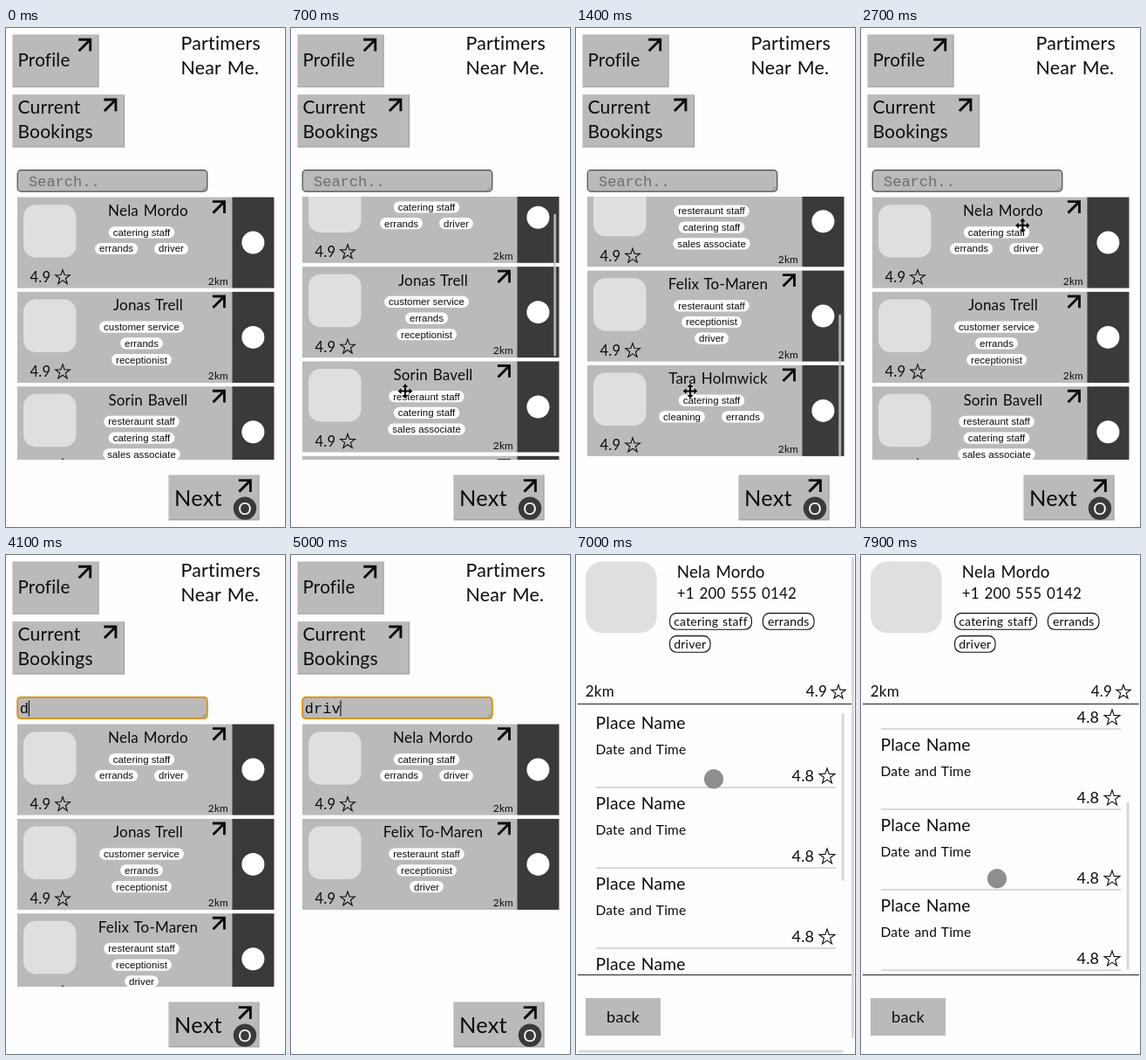
These frames come from a looping animation (320 px wide and 571 px high, 8 s). An HTML page:

```html
<!DOCTYPE html>
<html lang="en">
<head>
<meta charset="utf-8">
<title>Partimers Near Me</title>
<style>
  html, body { margin: 0; width: 100%; height: 100%; overflow: hidden; background: #fefdff; }
  svg { display: block; width: 100vw; height: 100vh; }
  text { font-family: Lato, "Open Sans", sans-serif; letter-spacing: .2px; word-spacing: .07em; fill: #0c0c0c; white-space: pre; }
  .tag { font-family: "Liberation Sans", Arial, sans-serif; letter-spacing: 0; word-spacing: 0; }
  .mono { font-family: "Courier New", "Liberation Mono", monospace; letter-spacing: 0; word-spacing: 0; }
</style>
</head>
<body>
<svg id="stage" viewBox="0 0 320 571"></svg>
<script>
const LOOP = 8000, STEP = 100;
const GRAY = '#bababb', PALE = '#dfdee0', DARK = '#3a393b', INK = '#0c0c0c';
const PITCH = 108.33, LIST_TOP = 193.6, ROW = 92;
const people = [
  { name: 'Nela Mordo', rows: [['catering staff'], ['errands', 'driver']] },
  { name: 'Jonas Trell', rows: [['customer service'], ['errands'], ['receptionist']] },
  { name: 'Sorin Bavell', rows: [['resteraunt staff'], ['catering staff'], ['sales associate']] },
  { name: 'Felix To-Maren', rows: [['resteraunt staff'], ['receptionist'], ['driver']] },
  { name: 'Tara Holmwick', rows: [['catering staff'], ['cleaning', 'errands']] }
];

// Drawing helpers
const pen = document.createElement('canvas').getContext('2d');
function widthOf(str, font) {
  pen.font = font;
  return pen.measureText(str).width;
}
const text = (x, y, size, str, more = '') => `<text x="${x}" y="${y}" font-size="${size}" ${more}>${str}</text>`;
const rect = (x, y, w, h, fill, more = '') => `<rect x="${x}" y="${y}" width="${w}" height="${h}" fill="${fill}" ${more}/>`;
const line = (x1, x2, y, color, w) => `<path d="M${x1} ${y}H${x2}" stroke="${color}" stroke-width="${w}"/>`;
const arrow = (x, y) =>
  `<path transform="translate(${x} ${y})" d="M-7.4-6H6.2V7.3M6.2-6L-6.8 7" fill="none" stroke="${INK}" stroke-width="2.9"/>`;

function star(x, y, r) {
  const points = Array.from({ length: 10 }, (_, i) => {
    const a = i * Math.PI / 5, d = i % 2 ? r * 0.4 : r;
    return `${(x + d * Math.sin(a)).toFixed(2)},${(y - d * Math.cos(a)).toFixed(2)}`;
  });
  return `<polygon points="${points.join(' ')}" fill="none" stroke="${INK}" stroke-width="1.1"/>`;
}

const button = (x, y, w, h) => rect(x, y, w, h, '#98989a') + rect(x + .4, y + .4, w - 1.4, h - 1.4, GRAY);

function tagRow(tags, y) {
  const gap = 19, widths = tags.map(s => widthOf(s, '11.5px "Liberation Sans", Arial') + 10);
  let x = 155.5 - (widths.reduce((a, b) => a + b) + gap * (tags.length - 1)) / 2;
  return tags.map((s, i) => {
    const w = widths[i];
    const out = rect(x, y - 6.6, w, 13.2, '#fff', 'rx="6.6"') +
      text(x + w / 2, y + 4, 11.5, s, 'class="tag" text-anchor="middle"');
    x += w + gap;
    return out;
  }).join('');
}

function card(p) {
  return `<g class="card">` +
    rect(13, 0, 247, 104, GRAY) + rect(259.5, 0, 48, 104, DARK) +
    rect(20, 8.6, 60.5, 60.5, PALE, 'rx="14"') +
    text(163, 21.5, 17, p.name, 'text-anchor="middle"') +
    p.rows.map((r, i) => tagRow(r, 40.2 + i * 18.7)).join('') +
    text(27.5, 97.4, 16.6, '4.9') + star(65, 91.8, 8.8) +
    text(255, 100.2, 11.8, '2km', 'text-anchor="end"') +
    arrow(244.3, 11) +
    `<circle cx="283.4" cy="52" r="13" fill="#fff"/></g>`;
}

const outlineTag = (x, y, w, s) =>
  rect(x, y, w, 18.6, 'none', `rx="7.5" stroke="${INK}" stroke-width="1.1"`) +
  text(x + w / 2, y + 14, 14, s, 'text-anchor="middle"');

const visit = i => `<g transform="translate(0 ${i * ROW})">` +
  text(22.5, 199.2, 19.3, 'Place Name') + text(22.5, 228, 15.5, 'Date and Time') +
  text(247.5, 259.4, 18, '4.8') + star(288, 253.4, 9.4) + line(23, 298, 266, '#b4b4b6', 1) + '</g>';

const home = `<g id="home">` +
  button(7.6, 7.6, 99, 60.2) + text(13.5, 44, 20.6, 'Profile') + arrow(90.5, 19.2) +
  button(7.6, 76.4, 128.4, 60.2) + text(13.5, 97.8, 21, 'Current') + text(13.5, 125.6, 21, 'Bookings') + arrow(119.7, 88) +
  text(200.5, 24.6, 21.4, 'Partimers') + text(200.5, 52.6, 21.4, 'Near Me.') +
  rect(13.2, 162.7, 217.6, 24.4, GRAY, 'id="field" rx="4"') +
  `<path d="M225 185.6l4.2-4.2M227.6 185.6l1.6-1.6" stroke="#666" stroke-width=".7"/>` +
  text(15.8, 181, 17, '', 'id="query" class="mono"') +
  `<path id="caret" d="M0 166.5V184.5" stroke="${INK}" stroke-width="1.1"/>` +
  `<g clip-path="url(#listClip)">${people.map(card).join('')}` +
  rect(301.2, 0, 3, 163, '#cacacc', 'id="listThumb" rx="1.5"') + '</g>' +
  button(186.6, 511.6, 104, 51.8) + text(193, 547, 25.4, 'Next') + arrow(274.2, 523.6) +
  `<circle cx="274" cy="549.6" r="13.2" fill="${DARK}"/>` +
  text(274.1, 556.6, 19.3, 'O', 'text-anchor="middle" style="fill:#fff"') + '</g>';

const detail = `<g id="detail">` +
  rect(11, 7.6, 81.6, 81.6, PALE, 'rx="19"') +
  text(115.8, 26.3, 18.7, people[0].name) + text(115.8, 50, 16.9, '+1 200 555 0142') +
  outlineTag(107.6, 66.6, 93.8, 'catering staff') + outlineTag(214.4, 66.6, 58.6, 'errands') + outlineTag(107.6, 92.6, 46.4, 'driver') +
  text(10.8, 162, 17, '2km') + text(263.8, 162, 17, '4.9') + star(301, 157, 8.6) +
  `<g clip-path="url(#visitClip)"><g id="visits">${[0, 1, 2, 3, 4].map(visit).join('')}</g></g>` +
  rect(304.6, 0, 3, 192, '#d8d7da', 'id="visitThumb" rx="1.5"') +
  line(2, 319, 170.5, '#222', 1) + line(2, 319, 480.5, '#222', 1) +
  rect(11, 507, 86, 43, GRAY) + text(54, 535, 18.2, 'back', 'text-anchor="middle"') +
  `<g id="pageBars">${rect(316, 2, 3, 551, '#d8d7da', 'rx="1.5"')}${rect(2, 566.5, 305, 3, '#d8d7da', 'rx="1.5"')}</g>` +
  `<circle id="touch" r="10.8" fill="#8f8d90" stroke="#828083" stroke-width=".6"/></g>`;

document.getElementById('stage').innerHTML =
  `<defs><clipPath id="listClip">${rect(0, 193, 320, 301, '#000')}</clipPath>` +
  `<clipPath id="visitClip">${rect(0, 171, 320, 309, '#000')}</clipPath></defs>` +
  rect(0, 0, 320, 571, '#fefdff') + home + detail +
  `<path id="pointer" d="M0-8.4 3.5-4.5H1.1V-1.1H4.5V-3.5L8.4 0 4.5 3.5V1.1H1.1V4.5H3.5L0 8.4-3.5 4.5H-1.1V1.1H-4.5V3.5L-8.4 0-4.5-3.5V-1.1H-1.1V-4.5H-3.5Z" fill="#000" stroke="#fff" stroke-width=".8" paint-order="stroke"/>`;

// Timing helpers
const el = Object.fromEntries([...document.querySelectorAll('[id]')].map(e => [e.id, e]));
const cards = [...document.querySelectorAll('.card')];
const ramp = (t, a, b) => Math.min(1, Math.max(0, (t - a) / (b - a)));
const ease = (t, a, b) => (1 - Math.cos(Math.PI * ramp(t, a, b))) / 2;
const set = (e, attrs) => { for (const k in attrs) e.setAttribute(k, attrs[k]); };
const show = (e, on) => set(e, { visibility: on ? 'visible' : 'hidden' });

const keyTimes = [4100, 4300, 4600, 4900, 5200, 5500];
const typedAt = t => 'driver'.slice(0, keyTimes.filter(k => k <= t).length);

// Each leg: start time, end time, x and y at its end
const legs = [[100, 300, 131, 415.5], [2200, 2900, 198, 182], [5800, 6600, 158, 256]];
function pointerAt(t) {
  let x = 249, y = 526;
  for (const [a, b, ex, ey] of legs) {
    const k = ease(t, a, b);
    x += (ex - x) * k;
    y += (ey - y) * k;
  }
  return [x, y];
}

function drawHome(t) {
  const query = typedAt(t), focused = t >= 3200;
  const scroll = 241 * (ease(t, 500, 1390) - ease(t, 1600, 2000));
  let slot = 0;
  people.forEach((p, i) => {
    const match = p.rows.flat().some(s => s.includes(query));
    set(cards[i], {
      display: match ? 'inline' : 'none',
      transform: `translate(0 ${LIST_TOP + (match ? slot++ : 0) * PITCH - scroll})`
    });
  });
  set(el.listThumb, { y: 197 + scroll * .541, opacity: .8 * (ramp(t, 500, 700) - ramp(t, 2200, 2500)) });

  const lit = ramp(t, 3100, 3300);
  set(el.field, { stroke: focused ? '#d9941a' : '#484848', 'stroke-width': 1.2 + .8 * lit });
  el.query.textContent = query || ' Search..';
  el.query.style.fill = query ? INK : '#6c6c6c';
  const lastKey = Math.max(3200, ...keyTimes.filter(k => k <= t));
  show(el.caret, focused && (t - lastKey) % 1000 < 500);
  set(el.caret, { transform: `translate(${16.2 + query.length * 10.2} 0)` });
}

function drawDetail(t) {
  const move = ease(t, 7200, 7500), scroll = 159 * ease(t, 7600, 7900);
  const shown = ramp(t, 6700, 7000) - ramp(t, 7200, 7500);
  set(el.visits, { transform: `translate(0 ${-scroll})` });
  set(el.visitThumb, { y: 181 + scroll * .64, opacity: shown + ramp(t, 7600, 7800) });
  set(el.pageBars, { opacity: shown });
  set(el.touch, { cx: 158 - 2 * move, cy: 256.3 + 114 * move });
}

function draw(t) {
  const onDetail = t >= 6800;
  set(el.home, { display: onDetail ? 'none' : 'inline' });
  set(el.detail, { display: onDetail ? 'inline' : 'none' });
  if (onDetail) drawDetail(t); else drawHome(t);
  show(el.pointer, (t >= 100 && t < 3700) || (t >= 5900 && !onDetail));
  set(el.pointer, { transform: `translate(${pointerAt(t)})` });
}

// The picture advances ten times a second
function tick() {
  const t = (performance.now() + 8) % LOOP;
  draw(Math.floor(t / STEP) * STEP);
  requestAnimationFrame(tick);
}
tick();
</script>
</body>
</html>
```
